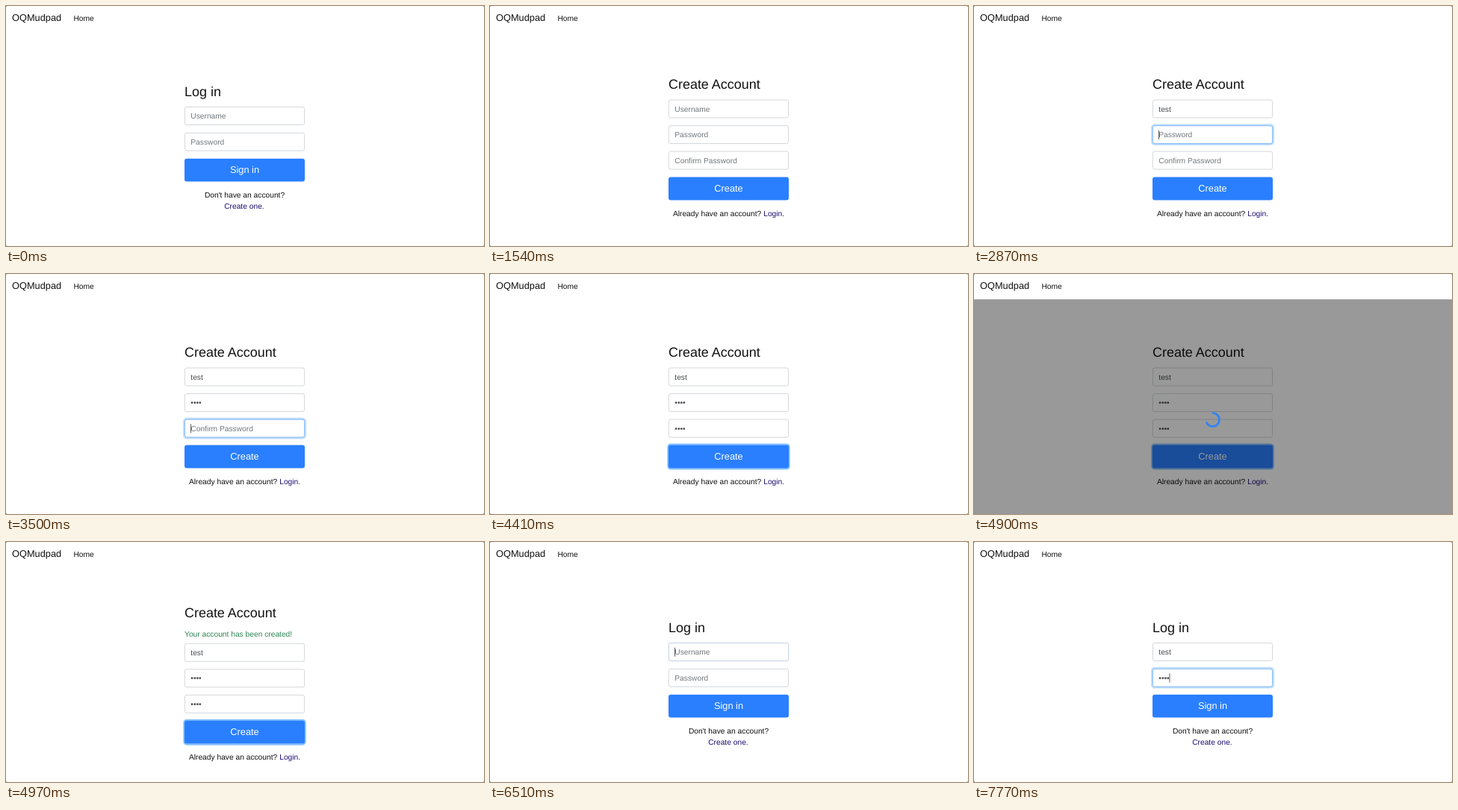
An HTML page that plays this animation: 640 px wide and 322 px high, repeating every 8 s.

```html
<!DOCTYPE html>
<html lang="en">
<head>
<meta charset="utf-8">
<title>Account form</title>
<style>
  html, body { margin: 0; width: 100%; height: 100%; overflow: hidden; background: #fff; }
  svg { display: block; width: 640px; height: 322px; }
  text {
    font-family: "Liberation Sans", Arial, sans-serif;
    font-size: 10.24px;
    fill: #111;
    text-rendering: geometricPrecision;
    white-space: pre;
  }
  .brand { font-size: 12.8px; }
  .title { font-size: 17.95px; }
  .label { font-size: 12.8px; fill: #fff; }
  .value { fill: #484b4f; }
  .hint { fill: #73777b; }
  .link { fill: #1c0d70; }
  .ok { fill: #2f8554; }
  .mid { text-anchor: middle; }
</style>
</head>
<body>
<svg id="stage" viewBox="0 0 640 322"></svg>
<script>
const LOOP = 8000, STEP = 70;
const LEFT = 239.4, WIDTH = 160.2, MID = 319.5;
const BLUE = '#297fff';

// Each row: time in ms, then what changes in the state.
const steps = [
  [0, { page: 'login', focus: '', hover: false, user: '', pass: '', again: '', busy: false, done: false }],
  [560, { hover: true }],
  [1470, { page: 'create', hover: false }],
  [2240, { focus: 'user' }],
  [2520, { user: 'test' }],
  [2730, { focus: 'pass' }],
  [3080, { pass: '••' }],
  [3150, { pass: '••••' }],
  [3290, { focus: 'again' }],
  [3780, { again: '•' }],
  [3850, { again: '•••' }],
  [3920, { again: '••••' }],
  [4060, { focus: 'button' }],
  [4480, { busy: true }],
  [4970, { busy: false, done: true }],
  [5320, { hover: true }],
  [5530, { focus: '' }],
  [5880, { page: 'login', hover: false, done: false, user: '', pass: '', again: '' }],
  [6510, { focus: 'user' }],
  [7000, { user: 'te' }],
  [7070, { user: 'test' }],
  [7350, { focus: 'pass' }],
  [7700, { pass: '••' }],
  [7770, { pass: '••••' }]
];
const focusSteps = steps.filter(([, change]) => 'focus' in change);

function el(parent, name, attrs = {}, text = '') {
  const node = document.createElementNS('http://www.w3.org/2000/svg', name);
  for (const key in attrs) node.setAttribute(key, attrs[key]);
  node.textContent = text;
  parent.append(node);
  return node;
}

const write = (parent, x, y, cls, text) => el(parent, 'text', { x, y, class: cls }, text);
const show = (node, on) => node.setAttribute('visibility', on ? 'inherit' : 'hidden');
const shift = (node, y) => node.setAttribute('transform', `translate(0 ${y})`);

function box(parent, y, h, grow, attrs) {
  return el(parent, 'rect', {
    x: LEFT - grow, y: y - grow, width: WIDTH + 2 * grow, height: h + 2 * grow,
    rx: 2.5 + grow, fill: 'none', ...attrs
  });
}

function addField(parent, id, y, hintText) {
  const base = y + 15.6;
  const ring = box(parent, y, 24, 1.4, { stroke: '#bfdeff', 'stroke-width': 2 });
  box(parent, y, 24, 0, { fill: '#fff', stroke: '#d3d7db' });
  const edge = box(parent, y, 24, 0, { stroke: '#80bdff' });
  const hint = write(parent, 247.3, base, 'hint', hintText);
  const value = write(parent, 247.3, base, 'value', '');
  const caret = el(parent, 'rect', { y: y + 6.2, width: 0.8, height: 12, fill: '#333' });
  return (state, t) => {
    const glow = focusLevel(id, t);
    ring.setAttribute('opacity', glow);
    edge.setAttribute('opacity', glow);
    value.textContent = state[id];
    show(hint, !state[id]);
    show(caret, state.focus === id);
    caret.setAttribute('x', 247.2 + (state[id] ? value.getComputedTextLength() : 0));
  };
}

function addButton(parent, y, text) {
  const ring = box(parent, y, 30.8, 1, { stroke: '#85c1ff', 'stroke-width': 2.2 });
  el(parent, 'rect', { x: 239, y, width: 161, height: 30.8, rx: 3, fill: BLUE });
  write(parent, MID, y + 19.6, 'label mid', text);
  return (state, t) => ring.setAttribute('opacity', focusLevel('button', t));
}

function addLink(parent, x, y, width, text) {
  write(parent, x, y, 'link', text);
  const line = el(parent, 'rect', { x, y: y + 1, width, height: 0.8, fill: '#1c0d70' });
  return state => show(line, state.hover);
}

const svg = document.getElementById('stage');

const login = el(svg, 'g');
write(login, 239, 121, 'title', 'Log in');
const loginParts = [
  addField(login, 'user', 135.5, 'Username'),
  addField(login, 'pass', 170.2, 'Password'),
  addButton(login, 204.7, 'Sign in'),
  addLink(login, 292.2, 271.9, 54, 'Create one.')
];
write(login, MID, 256.6, 'mid', "Don't have an account?");

const create = el(svg, 'g');
const heading = write(create, 239, 111, 'title', 'Create Account');
const notice = write(create, 239, 126.6, 'ok', 'Your account has been created!');
const form = el(create, 'g');
const createParts = [
  addField(form, 'user', 126, 'Username'),
  addField(form, 'pass', 160.6, 'Password'),
  addField(form, 'again', 195.1, 'Confirm Password'),
  addButton(form, 229.6, 'Create'),
  addLink(form, 366.2, 281.7, 28, 'Login.')
];
write(form, 244.9, 281.7, '', 'Already have an account? ');

const busy = el(svg, 'g');
el(busy, 'rect', { y: 34, width: 640, height: 288, fill: '#000', opacity: 0.4 });
const spinner = el(busy, 'circle', {
  cx: MID, cy: 195.5, r: 9, fill: 'none', stroke: '#2f82f5',
  'stroke-width': 2.7, pathLength: 360, 'stroke-dasharray': '255 105'
});

write(svg, 8, 20, 'brand', 'OQMudpad');
write(svg, 90.4, 19.5, '', 'Home');
for (const x of [0, 639]) {
  for (const y of [0, 321]) el(svg, 'rect', { x, y, width: 1, height: 1, fill: '#888' });
}

function ease(age) {
  const x = Math.min(1, Math.max(0, age / 150));
  return x * x * (3 - 2 * x);
}

function focusLevel(id, t) {
  let level = 0;
  focusSteps.forEach(([at, { focus }], i) => {
    if (focus !== id || t < at) return;
    const next = focusSteps[i + 1];
    const out = next && t >= next[0] ? ease(t - next[0] + 30) : 0;
    level = Math.max(level, ease(t - at + 30) * (1 - out));
  });
  return level;
}

function stateAt(t) {
  const state = {};
  for (const [at, change] of steps) if (at <= t) Object.assign(state, change);
  return state;
}

function draw(t) {
  const state = stateAt(t);
  const onLogin = state.page === 'login';
  show(login, onLogin);
  show(create, !onLogin);
  (onLogin ? loginParts : createParts).forEach(update => update(state, t));
  show(notice, state.done);
  shift(heading, state.done ? -10.2 : 0);
  shift(form, state.done ? 10.2 : 0);
  show(busy, state.busy);
  // One turn takes 750 ms.
  const angle = (t - 4900) / 750 * 360 - 95;
  spinner.setAttribute('transform', `rotate(${angle} ${MID} 195.5)`);
}

const start = performance.now();
function tick() {
  const t = (performance.now() - start) % LOOP;
  draw(Math.min(7770, Math.floor(t / STEP) * STEP));
  requestAnimationFrame(tick);
}
tick();
</script>
</body>
</html>
```
